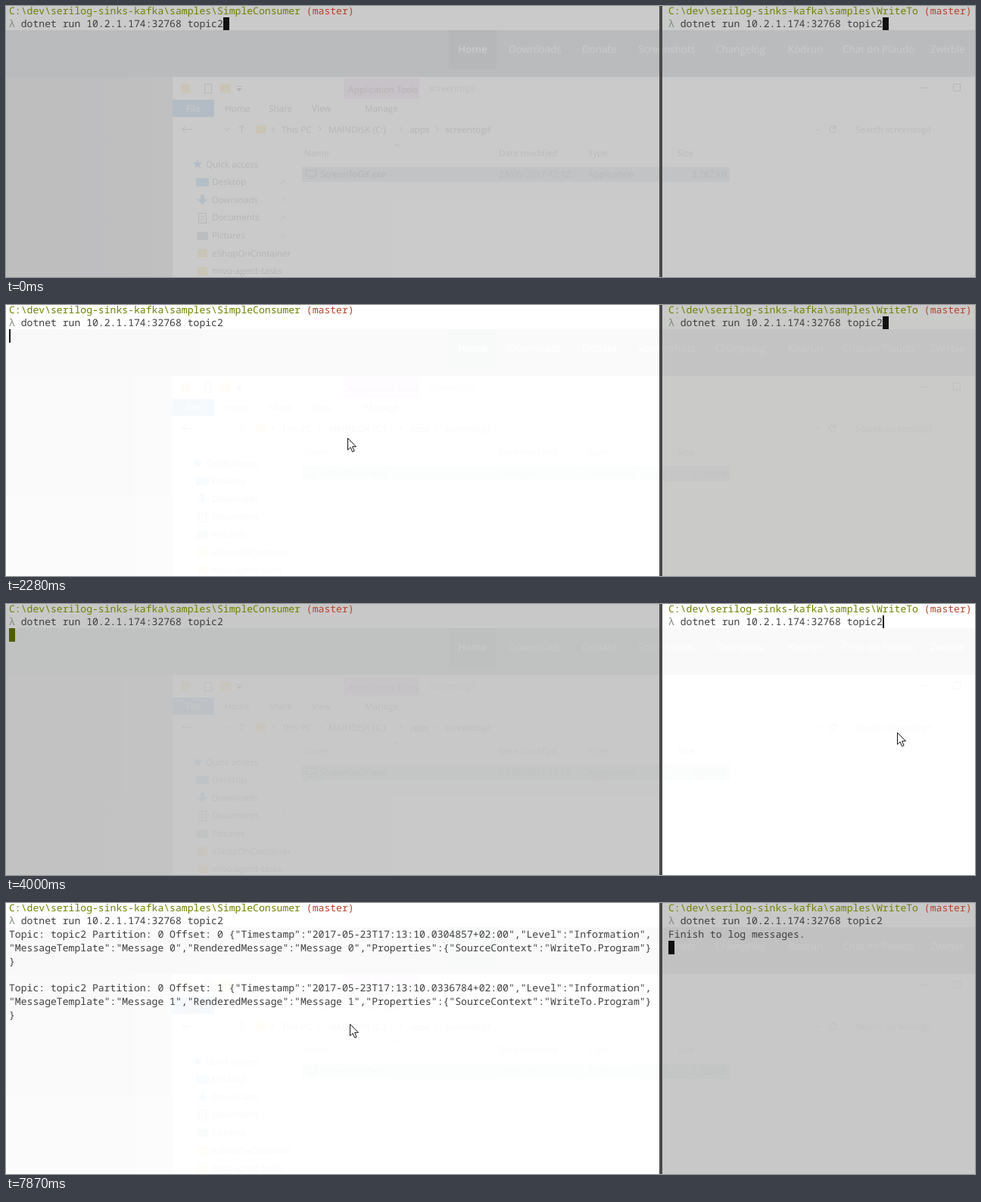
These frames come from a looping animation (1280x359 px, 8 s). An HTML page:

```html
<!DOCTYPE html>
<html lang="en">
<head>
<meta charset="utf-8">
<title>Kafka sink in two terminals</title>
<style>
html, body { margin: 0; width: 100%; height: 100%; overflow: hidden; background: #c5c5c5; }
svg { display: block; }
text { text-rendering: geometricPrecision; white-space: pre; }

.term { font: 13.1px "Noto Sans Mono", monospace; fill: #3e3e3e; }
.path { fill: #6f8000; }
.branch { fill: #b5432a; }
.prompt { fill: #7b8b78; }
.ui { font: 11.7px "Open Sans", sans-serif; fill: #222; }
.nav { font: 13.4px "Open Sans", sans-serif; fill: #fff; }
.line { fill: none; stroke: #333; }

/* every change is a hard cut on one 8 s clock */
.anim { animation: 8s step-end infinite; }
#leftBase { animation-name: left-base; }
#leftDesk { animation-name: left-desk; }
#rightBase { animation-name: right-base; }
#rightDesk { animation-name: right-desk; }
#leftCaret { animation-name: left-caret; }
#rightCaret { animation-name: right-caret; }
#done { animation-name: done; }
#msg0 { animation-name: msg0; }
#msg1 { animation-name: msg1; }
#mouse { animation-name: mouse; }

@keyframes left-base {
  0% { fill: #c5c5c5 } 11% { fill: #fff } 43.125% { fill: #c6c6c6 } 55.75%, 100% { fill: #fff }
}
@keyframes left-desk {
  0% { opacity: .1 } 11% { opacity: .035 } 43.125% { opacity: .05 } 55.75%, 100% { opacity: .035 }
}
@keyframes right-base {
  0% { fill: #c5c5c5 } 11% { fill: #c8c8c7 } 43.125% { fill: #fff } 55.75%, 100% { fill: #c6c6c6 }
}
@keyframes right-desk {
  0% { opacity: .1 } 11% { opacity: .05 } 43.125% { opacity: .035 } 55.75%, 100% { opacity: .04 }
}
@keyframes left-caret {
  0% { translate: 287px 15px; width: 8px; height: 17px; fill: #111; opacity: 1 }
  11% { width: 2px }
  17.625% { opacity: 0 }
  24.5% { opacity: 1 }
  28.5% { translate: 4px 32px; height: 18px }
  35.375% { opacity: 0 }
  41.25% { opacity: 1 }
  43.125% { width: 8px; fill: #4f5d00 }
  55.75% { width: 2px; fill: #111 }
  61.5% { opacity: 0 }
  68.375% { opacity: 1 }
  74.125% { opacity: 0 }
  78.25% { translate: 4px 103px; opacity: 1 }
  83.875% { opacity: 0 }
  90.75% { opacity: 1 }
  91.75% { translate: 4px 174px }
  98.375%, 100% { translate: 4px 174px; width: 2px; height: 18px; fill: #111; opacity: 0 }
}
@keyframes right-caret {
  0% { translate: 1158px 15px; width: 8px; height: 17px; opacity: 1 }
  43.125% { width: 2px; opacity: 0 }
  50% { opacity: 1 }
  55.75%, 100% { translate: 875px 50px; width: 8px; height: 18px; opacity: 1 }
}
@keyframes done { 0% { opacity: 0 } 55.75%, 100% { opacity: 1 } }
@keyframes msg0 { 0% { opacity: 0 } 78.25%, 100% { opacity: 1 } }
@keyframes msg1 { 0% { opacity: 0 } 91.75%, 100% { opacity: 1 } }
@keyframes mouse {
  0% { translate: 760px 330px; opacity: 0 }
  6.125% { translate: 760px 330px; opacity: 1 }
  7.1% { translate: 690px 280px }
  8.075% { translate: 600px 225px }
  9.05% { translate: 510px 190px }
  10.025% { translate: 458px 178px }
  11% { translate: 451px 176px }
  37.25% { translate: 490px 180px }
  38.25% { translate: 690px 190px }
  39.25% { translate: 930px 188px }
  40.25% { translate: 1130px 176px }
  41.25% { translate: 1177px 170px }
  55.75%, 100% { translate: 454px 160px; opacity: 1 }
}
</style>
</head>
<body>
<svg width="1280" height="359" viewBox="0 0 1280 359">
  <defs>
    <clipPath id="leftClip"><rect width="863" height="359"/></clipPath>
    <clipPath id="rightClip"><rect x="867" width="413" height="359"/></clipPath>
    <linearGradient id="page">
      <stop offset="0" stop-color="#87878b"/>
      <stop offset=".7" stop-color="#8a8a98"/>
      <stop offset="1" stop-color="#9a9a9f"/>
    </linearGradient>

    <!-- desktop seen through the translucent terminals -->
    <g id="desk">
      <rect width="1280" height="359" fill="#fff"/>
      <rect y="32" width="1280" height="62" fill="#5a6875"/>
      <rect x="585" y="32" width="63" height="51" fill="#36424e"/>
      <rect y="94" width="220" height="265" fill="url(#page)"/>
      <g class="nav">
        <text x="597" y="62" font-weight="600">Home</text>
        <text x="664" y="62">Downloads</text>
        <text x="761" y="62">Donate</text>
        <text x="835" y="62">Screenshots</text>
        <text x="937" y="62">Changelog</text>
        <text x="1033" y="62">Kodrun</text>
        <text x="1105" y="62">Chat on Plaudo</text>
        <text x="1221" y="62">Zwirble</text>
      </g>

      <rect x="446" y="96" width="100" height="27" fill="#e0a8dc"/>
      <rect x="220" y="124" width="55" height="23" fill="#1565c0"/>
      <rect x="391" y="213" width="565" height="20" fill="#a9b4bc"/>
      <g fill="#f2c230">
        <rect x="231" y="103" width="12" height="12"/>
        <rect x="283" y="103" width="14" height="12"/>
        <rect x="330" y="158" width="13" height="11"/>
        <rect x="253" y="322" width="13" height="11"/>
        <rect x="253" y="346" width="13" height="11"/>
      </g>
      <path d="M253 203l1.8 4.2 4.4.4-3.3 3 1 4.4-3.9-2.4-3.9 2.4 1-4.4-3.3-3 4.4-.4z" fill="#1b7fd0"/>
      <rect x="251" y="228" width="17" height="11" fill="#1b8fe0"/>
      <path d="M257 250h5v6h4l-6.500 7-6.500-7h4z" fill="#1b7fd0"/>
      <rect x="252" y="299" width="15" height="11" fill="#678"/>
      <g class="line">
        <path d="M262.500 103.500h9v12h-9zM254.500 274.500h10v13h-10zM257 279h5M257 283h5"/>
        <path d="M396.500 217.500h13v8h-13zM399 228.500h8"/>
        <path d="M304 106.500h8M246 163.500h-13l4-4m-4 4l4 4M289 162l3 3 3-3M311.500 169v-11l-4 4m4-4l4 4"/>
        <path d="M351 160l3 3-3 3M413 160l3 3-3 3M520 160l3 3-3 3M568 160l3 3-3 3M513 186l3-3 3 3"/>
        <path d="M1069 162l3 3 3-3M1096 161a4.500 4.500 0 1 0 .5 4M1096 158v4h-4"/>
        <path d="M1207 108.500h10M1251.500 103.500h9v9h-9z"/>
        <path d="M363 236l3-3m-1-3l4 4M363 260l3-3m-1-3l4 4M363 283l3-3m-1-3l4 4M363 307l3-3m-1-3l4 4" stroke="#777"/>
      </g>
      <path d="M304.500 109h7l-3.500 4z"/>
      <g class="ui">
        <text x="452" y="115">Application Tools</text>
        <text x="559" y="113" opacity=".6">screentogif</text>
        <text x="238" y="140" style="fill:#fff">File</text>
        <text x="289" y="140">Home</text>
        <text x="347" y="140">Share</text>
        <text x="404" y="140">View</text>
        <text x="474" y="140">Manage</text>
        <text x="364" y="168">This PC</text>
        <text x="426" y="168">MAINDISK (C:)</text>
        <text x="533" y="168">apps</text>
        <text x="580" y="168">screentogif</text>
        <text x="1122" y="168" opacity=".7">Search screentogif</text>
        <g opacity=".75">
          <text x="394" y="199">Name</text>
          <text x="651" y="199">Date modified</text>
          <text x="769" y="199">Type</text>
          <text x="887" y="199">Size</text>
        </g>
        <text x="415" y="227">ScreenToGif.exe</text>
        <g opacity=".7">
          <text x="651" y="227">23/05/2017 17:12</text>
          <text x="769" y="227">Application</text>
          <text x="952" y="227" text-anchor="end">2,782 kB</text>
        </g>
        <text x="264" y="214">Quick access</text>
        <text x="272" y="237">Desktop</text>
        <text x="272" y="261">Downloads</text>
        <text x="272" y="284">Documents</text>
        <text x="272" y="308">Pictures</text>
        <text x="272" y="332">eShopOnContainer</text>
        <text x="272" y="355">mivo-agent-tasks</text>
      </g>
    </g>
  </defs>

  <g clip-path="url(#leftClip)">
    <rect id="leftBase" class="anim" width="863" height="359"/>
    <use id="leftDesk" class="anim" href="#desk"/>
  </g>
  <g clip-path="url(#rightClip)">
    <rect id="rightBase" class="anim" x="867" width="413" height="359"/>
    <use id="rightDesk" class="anim" href="#desk"/>
  </g>
  <rect x="863" width="4" height="359" fill="#4a4a4a"/>

  <g class="term">
    <text x="4" y="10.700"><tspan class="path">C:\dev\serilog-sinks-kafka\samples\SimpleConsumer</tspan> <tspan class="branch">(master)</tspan></text>
    <text x="4" y="28.450"><tspan class="prompt">λ</tspan> dotnet run 10.2.1.174:32768 topic2</text>
    <g id="msg0" class="anim">
      <text x="4" y="46.200">Topic: topic2 Partition: 0 Offset: 0 {"Timestamp":"2017-05-23T17:13:10.0304857+02:00","Level":"Information",</text>
      <text x="4" y="63.950">"MessageTemplate":"Message 0","RenderedMessage":"Message 0","Properties":{"SourceContext":"WriteTo.Program"}</text>
      <text x="4" y="81.700">}</text>
    </g>
    <g id="msg1" class="anim">
      <text x="4" y="117.200">Topic: topic2 Partition: 0 Offset: 1 {"Timestamp":"2017-05-23T17:13:10.0336784+02:00","Level":"Information",</text>
      <text x="4" y="134.950">"MessageTemplate":"Message 1","RenderedMessage":"Message 1","Properties":{"SourceContext":"WriteTo.Program"}</text>
      <text x="4" y="152.700">}</text>
    </g>
    <text x="875" y="10.700"><tspan class="path">C:\dev\serilog-sinks-kafka\samples\WriteTo</tspan> <tspan class="branch">(master)</tspan></text>
    <text x="875" y="28.450"><tspan class="prompt">λ</tspan> dotnet run 10.2.1.174:32768 topic2</text>
    <text id="done" class="anim" x="875" y="46.200">Finish to log messages.</text>
  </g>

  <rect id="leftCaret" class="anim" width="8" height="17"/>
  <rect id="rightCaret" class="anim" width="8" height="17" fill="#111"/>
  <path id="mouse" class="anim" d="M.5.5v15.500l3.600-3.400 2.500 5.900 2.500-1.100-2.500-5.700h4.900z" fill="#fff" stroke="#111"/>
</svg>
</body>
</html>
```
